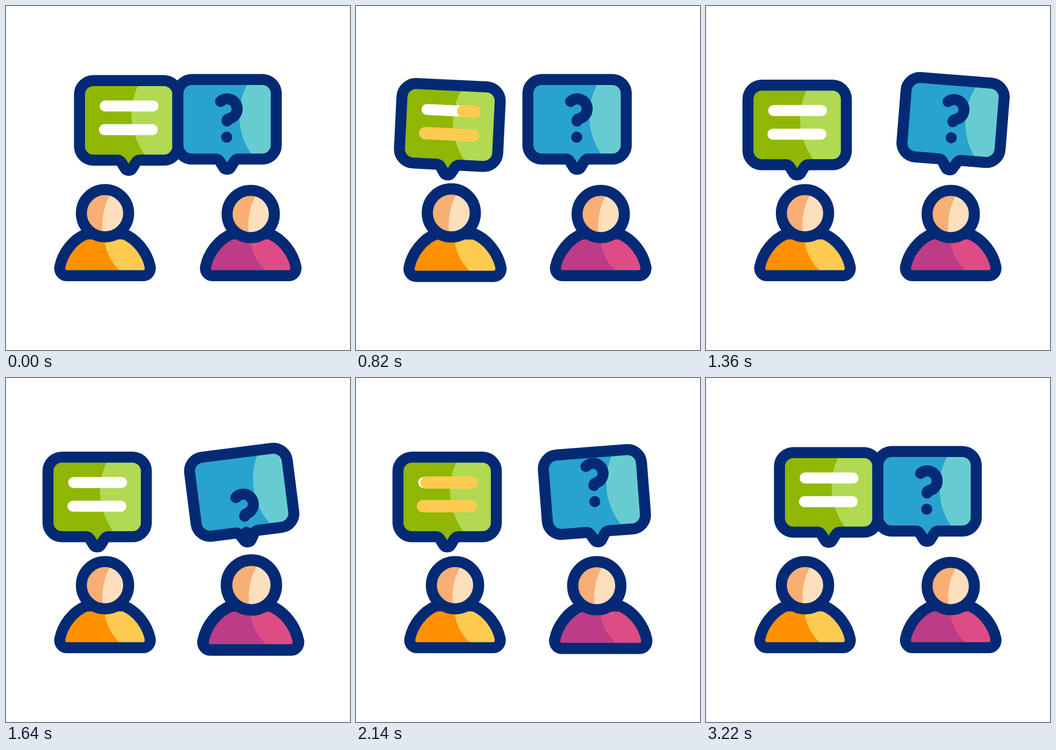
Animation, 640 px wide and 640 px high, one loop 3.38 s. Source, as an HTML page:

```html
<!DOCTYPE html>
<html lang="en">
<head>
<meta charset="utf-8">
<title>Conversation</title>
<style>
  html, body { margin: 0; width: 100%; height: 100%; overflow: hidden; background: #fff; }
  svg { display: block; width: 100vw; height: 100vh; }
  .edge { fill: none; stroke: #042a76; stroke-width: 20.5; stroke-linejoin: round; stroke-linecap: round; }
  .bar { stroke: #fff; stroke-width: 20.5; stroke-linecap: round; }
  .ink { stroke: #fecb50; stroke-width: 23; stroke-linecap: round; }
</style>
</head>
<body>
<svg viewBox="0 0 640 640">
  <defs>
    <!-- bubble origin: bottom of the tail -->
    <path id="box" d="M-65.5 -177.25H65.5A26 26 0 0 1 91.5 -151.25V-55.25A26 26 0 0 1 65.5 -29.25H22
      C15.5 -29.25 14 -26 11 -21L6 -13C3.5 -9.3 -3.5 -9.3 -6 -13L-11 -21C-14 -26 -15.5 -29.25 -22 -29.25
      H-65.5A26 26 0 0 1 -91.5 -55.25V-151.25A26 26 0 0 1 -65.5 -177.25Z"/>
    <path id="torso" d="M-35 2.5C-60 12.5 -79 38.5 -84 63.5C-85.5 72.5 -79.5 80.25 -71 80.25H71
      C79.5 80.25 85.5 72.5 84 63.5C79 38.5 60 12.5 35 2.5Z"/>
    <path id="torsoLight" d="M-2 5C0 38 14 62 39 80.25H71C79.5 80.25 85.5 72.5 84 63.5C79 38.5 60 12.5 35 2.5Z"/>
    <g id="face">
      <circle r="44" fill="#f7af74"/>
      <path d="M11.5 -37C-1 -18 -7 10 -4 38A38 38 0 0 0 11.5 -37Z" fill="#fddfbd"/>
      <circle r="44" class="edge"/>
    </g>
  </defs>

  <g id="personL">
    <use href="#torso" fill="#ff9100"/>
    <use href="#torsoLight" fill="#fecb50"/>
    <use href="#torso" class="edge"/>
    <use href="#face" id="headL"/>
  </g>
  <g id="personR">
    <use href="#torso" fill="#bc3c87"/>
    <use href="#torsoLight" fill="#de4c86"/>
    <use href="#torso" class="edge"/>
    <use href="#face" id="headR"/>
  </g>

  <g id="bubbleL">
    <use href="#box" fill="#90b606"/>
    <path d="M20 -173L17 -167C2 -135 -3 -85 30 -39L34 -34H84V-172Z" fill="#b1d952"/>
    <use href="#box" class="edge"/>
    <line class="bar" x1="-43.7" x2="45.3" y1="-130" y2="-130"/>
    <line class="bar" x1="-45" x2="44" y1="-86" y2="-86"/>
    <line class="ink" id="ink1" y1="-130" y2="-130"/>
    <line class="ink" id="ink2" y1="-86" y2="-86"/>
  </g>
  <g id="bubbleR">
    <use href="#box" fill="#28a2cf"/>
    <path d="M40 -173L37 -167C19 -135 15 -80 45 -39L49 -34H84V-172Z" fill="#67ccd1"/>
    <use href="#box" class="edge"/>
    <g id="mark">
      <path class="edge" d="M-12 -136.5C-8 -140 -4 -141.3 0 -141.3A18.6 18.6 0 0 1 4 -104.5Q0 -103.5 0 -100"/>
      <circle cx="-0.7" cy="-70" r="10.3" fill="#042a76"/>
    </g>
  </g>
  <line class="ink" id="spark" x1="320" x2="320" style="stroke-width:20.5"/>
</svg>
<script>
const LOOP = 3380;
const $ = id => document.getElementById(id);
const clamp = v => Math.min(1, Math.max(0, v));
const part = (t, from, to) => clamp((t - from) / (to - from));
const smooth = p => (1 - Math.cos(Math.PI * p)) / 2;
const out = p => 1 - (1 - p) ** 2;
const mix = (a, b, p) => a + (b - a) * p;

// value of a [time, value] table at t, eased between its steps
function track(t, steps) {
  let [t0, v0] = steps[0];
  for (const [t1, v1] of steps) {
    if (t < t1) return t1 === t0 ? v0 : mix(v0, v1, smooth(part(t, t0, t1)));
    t0 = t1;
    v0 = v1;
  }
  return v0;
}

const TILT = [[160, 0], [460, 5], [670, -7.3], [880, 5], [1090, -7.3], [1300, 0]];
const PULSE = [[0, 1], [270, 1.1], [783, 1]];
const NOD = [[0, 0], [200, 1.5], [590, -8.4], [800, 0]];
const DROP = [[1460, 0], [1650, 42], [2130, -15.5], [2290, 5], [2400, 0]];

function person(side, t, x, headY) {
  $('person' + side).setAttribute('transform', `translate(${x} 421.5) scale(${track(t, PULSE)})`);
  $('head' + side).setAttribute('transform', `translate(${track(t, NOD)} ${headY})`);
}

function bubble(side, apart, tilt, near, far) {
  const x = mix(near[0], far[0], apart), y = mix(near[1], far[1], apart);
  $('bubble' + side).setAttribute('transform', `translate(${x} ${y}) rotate(${tilt})`);
}

// shows the stretch a..b of a stroke, hidden when empty
function trim(id, axis, from, to, a, b) {
  const el = $(id);
  el.setAttribute(axis + 1, mix(from, to, a));
  el.setAttribute(axis + 2, mix(from, to, b));
  el.style.display = b - a > 0.002 ? '' : 'none';
}

// both bars are inked one after the other, then wiped the same way
function ink(t) {
  const s = t < 1400 ? t : t - 1420;
  const seg = (a, b) => smooth(part(s, a, b));
  trim('ink1', 'x', -43.7, 45.3, seg(690, 885), seg(300, 500));
  trim('ink2', 'x', -45, 44, seg(870, 985), seg(500, 690));
}

function draw(t) {
  person('L', t - 170, 184.2, -36);
  person('R', t - 1500, 455.3, -34.5);

  const apartL = out(part(t, 140, 420)) - out(part(t, 2740, 3220));
  const apartR = out(part(t, 1100, 1360)) - out(part(t, 2740, 3080));
  bubble('L', apartL, track(t, TILT), [228.2, 316], [169.6, 324.5]);
  bubble('R', apartR, track(t - 960, TILT), [411.3, 314], [451.5, 315]);

  ink(t);
  $('mark').setAttribute('transform', `translate(0 ${track(t, DROP)})`);
  trim('spark', 'y', 310, 350, smooth(part(t, 2940, 3140)), smooth(part(t, 2800, 2980)));
}

const start = performance.now();
function tick() {
  draw((performance.now() - start) % LOOP);
  requestAnimationFrame(tick);
}
tick();
</script>
</body>
</html>
```
